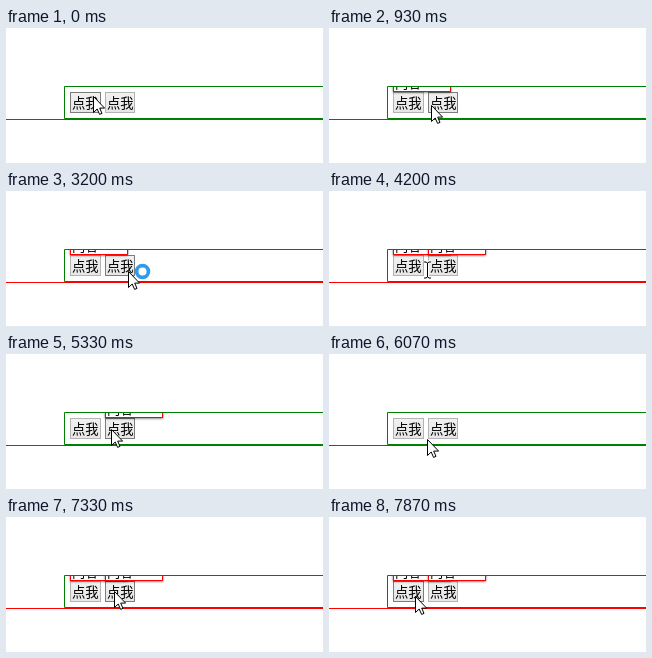
These frames come from a looping animation (317x135 px, 8 s). An HTML page:

```html
<!DOCTYPE html>
<html lang="zh-CN">
<head>
<meta charset="utf-8">
<title>点我</title>
<style>
  html, body { margin: 0; width: 100%; height: 100%; overflow: hidden; background: #fff; }
  svg { display: block; width: 100%; height: 100%; }
  text { font: 350 13.33px "Noto Sans CJK SC", "Noto Sans CJK", sans-serif; fill: #000; }
  .popup rect { fill: #fff; stroke: #f00; }
  .button rect { fill: url(#face); stroke: #b4b4b4; }
  .button.hover rect { stroke: #7c7c7c; }
  .button.down rect { fill: #e0e0e0; }
</style>
</head>
<body>
<svg viewBox="0 0 317 135" xmlns="http://www.w3.org/2000/svg">
  <defs>
    <linearGradient id="face" x2="0" y2="1">
      <stop stop-color="#f1f1f1"/><stop offset="1" stop-color="#e6e6e6"/>
    </linearGradient>
    <filter id="shadow" x="-20%" y="-20%" width="140%" height="140%">
      <feDropShadow dx="0" dy="0.5" stdDeviation="1.2" flood-color="#000" flood-opacity=".6"/>
    </filter>
    <clipPath id="inside"><rect x="59" y="59" width="258" height="31"/></clipPath>
  </defs>

  <rect y="91" width="317" height="1" fill="#f00"/>
  <path d="M318 58.5H58.5V90.5H318" fill="none" stroke="#008000"/>

  <g id="buttons"></g>
  <g id="popups" clip-path="url(#inside)"></g>

  <g id="cursor">
    <path id="arrow" d="M.5 .5V16.5L4.2 13 6.6 18.4 9 17.4 6.7 12.1H11.6Z" fill="#fff" stroke="#000"/>
    <g id="beam" fill="none">
      <path id="stem" d="M-3 -8H-1L.5 -7 2 -8H4M.5 -7V7M-3 8H-1L.5 7 2 8H4" stroke="#fff" stroke-width="3"/>
      <use href="#stem" style="display:none"/>
      <path d="M-3 -8H-1L.5 -7 2 -8H4M.5 -7V7M-3 8H-1L.5 7 2 8H4" stroke="#000"/>
    </g>
    <circle id="busy" cx="14.5" cy=".5" r="5.9" fill="#fff" stroke="#2f9bee" stroke-width="3.7"/>
  </g>
</svg>
<script>
  const LOOP = 8000;
  const STEP = 200 / 3; // 15 picture changes per second
  const $ = id => document.getElementById(id);

  // Pointer moves, timed in steps; "dip" bows the path downwards
  const home = { x: 87, y: 68 };
  const moves = [
    { from: 0, to: 3, x: 85, y: 72 },
    { from: 12, to: 20, x: 134, y: 86 },
    { from: 23, to: 30, x: 122, y: 80 },
    { from: 60, to: 66, x: 84, y: 79 },
    { from: 72, to: 81, x: 106, y: 75 },
    { from: 88, to: 97, x: 88, y: 81, dip: 9 },
    { from: 101, to: 107, x: 108, y: 74 },
    { from: 111, to: 118, x: 86, y: 79 }
  ];

  // Each click toggles the popup above its button
  const items = [
    { x: 64, width: 31, clicks: [9, 70, 100] },
    { x: 99, width: 30, clicks: [54, 83, 110] }
  ];
  const busy = { from: 48, to: 53 };

  for (const item of items) {
    const { x, width } = item;
    $('buttons').insertAdjacentHTML('beforeend',
      `<g class="button"><rect x="${x + .5}" y="64.5" width="${width - 1}" height="20"/>
       <text x="${x + 2}" y="80">点我</text></g>`);
    $('popups').insertAdjacentHTML('beforeend',
      `<g class="popup"><rect x="${x + .5}" y="30.5" width="57" height="33" filter="url(#shadow)"/>
       <text x="${x + 2}" y="60">内容</text></g>`);
    item.button = $('buttons').lastElementChild;
    item.popup = $('popups').lastElementChild;
  }

  const show = (el, on) => el.setAttribute('visibility', on ? 'visible' : 'hidden');
  const ease = k => k * (3 - k) / 2;

  function pointerAt(step) {
    let { x, y } = home;
    for (const move of moves) {
      if (step < move.from) break;
      const k = Math.min(1, (step - move.from) / (move.to - move.from));
      x += (move.x - x) * ease(k);
      y += (move.y - y) * ease(k) + (move.dip || 0) * Math.sin(Math.PI * k);
    }
    return [Math.round(x), Math.round(y)];
  }

  function draw(time) {
    const step = Math.floor((time % LOOP + 5) / STEP);
    const [x, y] = pointerAt(step);
    const inRow = y >= 64 && y < 85;
    const overText = inRow && x >= 95 && x < 99;

    for (const item of items) {
      const over = inRow && x >= item.x && x < item.x + item.width;
      const count = item.clicks.filter(click => click <= step).length;
      item.button.classList.toggle('hover', over);
      item.button.classList.toggle('down', over && item.clicks.includes(step + 1));
      show(item.popup, count % 2 === 1);
    }
    $('cursor').setAttribute('transform', `translate(${x} ${y})`);
    show($('arrow'), !overText);
    show($('beam'), overText);
    show($('busy'), step >= busy.from && step < busy.to);
  }

  const start = performance.now();
  function tick() {
    draw(performance.now() - start);
    requestAnimationFrame(tick);
  }
  tick();
</script>
</body>
</html>
```
